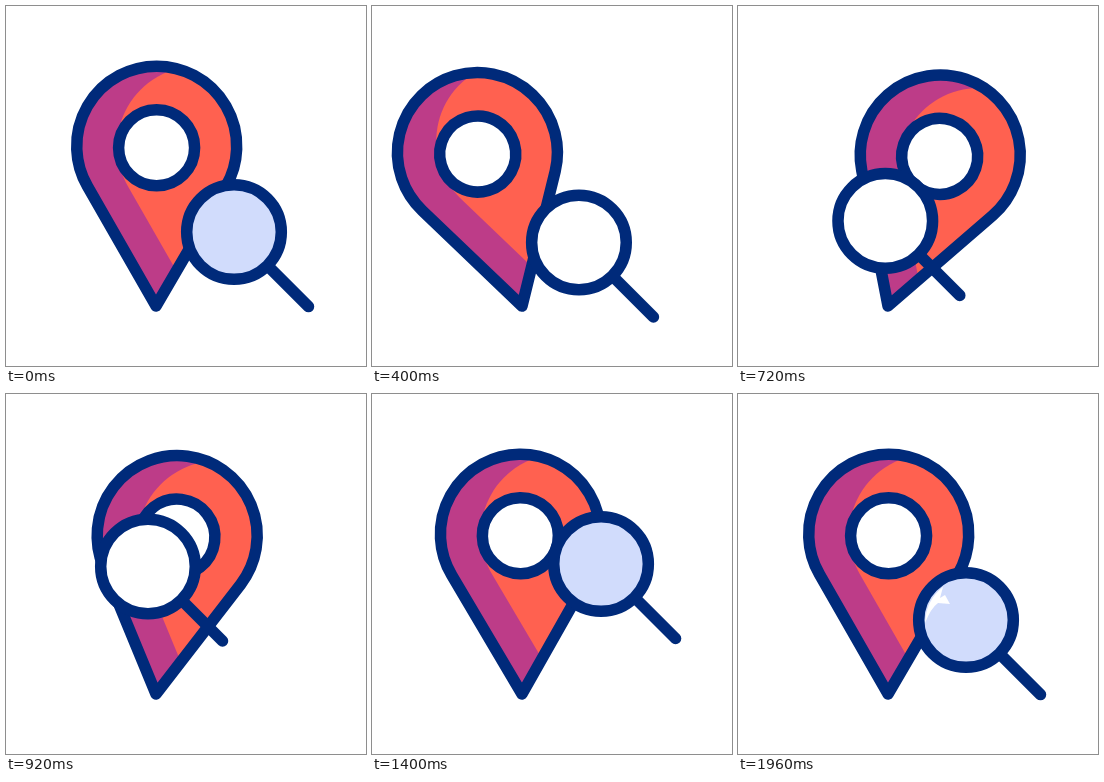
An HTML page for the animation above (2000 ms loop, 360 by 360 pixels).

```html
<!DOCTYPE html>
<html lang="en">
<head>
<meta charset="utf-8">
<title>Location search</title>
<style>
  html, body { margin: 0; width: 100%; height: 100%; overflow: hidden; background: #fff; }
  svg { display: block; width: 100vw; height: 100vh; }
  .line { stroke: #002a7a; stroke-width: 11.5; stroke-linecap: round; stroke-linejoin: round; }
</style>
</head>
<body>
<svg viewBox="0 0 360 360">
  <defs>
    <path id="drop" d="M150 300 L81.4 180.2 A80 80 0 1 1 220 180.2 Z"/>
    <clipPath id="inside"><use href="#drop"/></clipPath>
  </defs>
  <g id="pin">
    <use href="#drop" fill="#bd3c88"/>
    <g clip-path="url(#inside)"><use href="#drop" x="40.5" fill="#ff6150"/></g>
    <use href="#drop" class="line" fill="none"/>
    <circle class="line" cx="150.6" cy="141.7" r="38" fill="#fff"/>
  </g>
  <g id="lens">
    <path class="line" d="M34 34 L74.5 74.5"/>
    <circle id="glass" class="line" r="47.3"/>
    <path id="glint" fill="#fff" d="M-23 -33 Q-40 -20 -41 3 Q-35 -12 -28 -17 L-16 -16 L-21 -25 L-26 -22 Z"/>
  </g>
</svg>
<script>
  const LOOP = 2000, STEP = 40;
  const $ = id => document.getElementById(id);
  const pin = $('pin'), lens = $('lens'), glass = $('glass'), glint = $('glint');

  // [time, degrees]: a swing about the tip that dies down
  const swing = [[0, 0], [352, -17.8], [745, 19.2], [1140, -9.6], [1600, 5], [1960, 0], [2000, 0]];

  // [time, degrees, radius]: one turn of the lens around ORBIT
  const ORBIT = [189, 188];
  const turn = [
    [0, 44.3, 54.5], [240, 44.3, 54.5], [520, 100.4, 49.8], [920, 198.3, 49.5],
    [1400, 335.8, 43.9], [1600, 371.5, 50], [1720, 393.1, 53.1],
    [1960, 404.3, 54.5], [2000, 404.3, 54.5]
  ];

  const segment = (keys, t) => Math.max(0, keys.findIndex(k => t < k[0]) - 1);

  function sway(keys, t) {
    const i = segment(keys, t), [t0, a] = keys[i], [t1, b] = keys[i + 1];
    return a + (b - a) * (1 - Math.cos(Math.PI * (t - t0) / (t1 - t0))) / 2;
  }

  // Smooth curve through the keys, flat wherever the direction reverses
  function curve(keys, t, col) {
    const i = segment(keys, t);
    const rate = j => (keys[j + 1][col] - keys[j][col]) / (keys[j + 1][0] - keys[j][0]);
    const slope = j => {
      if (j === 0 || j === keys.length - 1) return 0;
      const p = rate(j - 1), q = rate(j);
      return p * q > 0 ? 2 * p * q / (p + q) : 0;
    };
    const span = keys[i + 1][0] - keys[i][0], u = (t - keys[i][0]) / span, v = 1 - u;
    return keys[i][col] * v * v * (1 + 2 * u) + keys[i + 1][col] * u * u * (1 + 2 * v)
      + span * u * v * (slope(i) * v - slope(i + 1) * u);
  }

  function draw(t) {
    pin.setAttribute('transform', `rotate(${sway(swing, t)} 150 300)`);
    const angle = curve(turn, t, 1) * Math.PI / 180, r = curve(turn, t, 2);
    const x = ORBIT[0] + r * Math.cos(angle), y = ORBIT[1] + r * Math.sin(angle);
    lens.setAttribute('transform', `translate(${x} ${y})`);
    glass.setAttribute('fill', t >= 320 && t < 1200 ? '#fff' : '#d1dcfc');
    glint.setAttribute('visibility', t >= 1960 ? 'visible' : 'hidden');
  }

  const start = performance.now();
  function tick() {
    const t = (performance.now() - start) % LOOP;
    draw(Math.floor(t / STEP) * STEP);
    requestAnimationFrame(tick);
  }
  tick();
</script>
</body>
</html>
```
